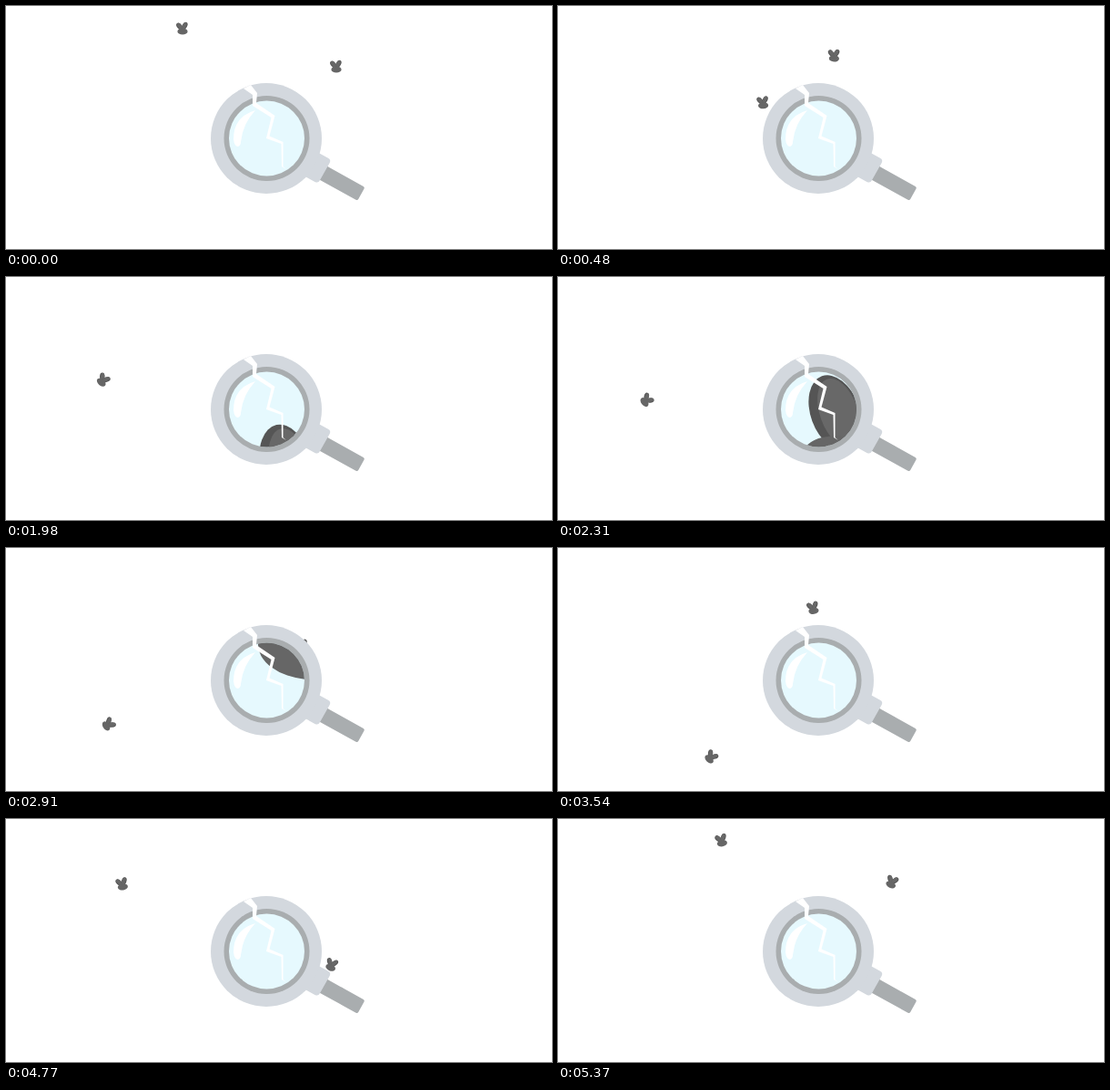
An HTML page that plays this animation: 600x268 px, repeating every 5.4 s.

```html
<!DOCTYPE html>
<html lang="en">
<head>
<meta charset="utf-8">
<title>Flies around a cracked magnifier</title>
<style>
  html, body { margin: 0; width: 100%; height: 100%; overflow: hidden; background: #fff; }
  svg { display: block; width: 600px; height: 268px; }
</style>
</head>
<body>
<svg viewBox="0 0 600 268">
  <defs>
    <clipPath id="glass"><circle cx="286.5" cy="146" r="41.5"/></clipPath>
    <g id="wing">
      <ellipse rx="2.7" ry="4.3" fill="#555"/>
      <ellipse cx=".4" cy=".2" rx="2.1" ry="4" fill="#686868"/>
    </g>
    <g id="fly">
      <use href="#wing" transform="translate(-3.4 -2.6) rotate(-38)"/>
      <use href="#wing" transform="translate(2.4 -3.2) rotate(28) scale(-1 1)"/>
      <ellipse cy="3" rx="5.6" ry="3.6" fill="#666"/>
    </g>
  </defs>

  <use id="a" href="#fly"/>
  <use id="b" href="#fly"/>

  <g transform="translate(286 146) rotate(29)">
    <rect x="70" y="-5.5" width="51" height="17" rx="2" fill="#a9adaf"/>
    <rect x="50" y="-14" width="24" height="30" rx="4" fill="#d3d8de"/>
  </g>
  <circle cx="286" cy="146" r="61" fill="#d3d8de"/>
  <circle cx="286.5" cy="146" r="47" fill="#a9adaf"/>
  <circle cx="286.5" cy="146" r="41.5" fill="#e6f9fe"/>
  <path d="M274 115Q250 122 250 147Q251 155 255 155Q258 154 258 150Q260 130 274 115Z" fill="#fff"/>
  <g clip-path="url(#glass)"><use id="big" href="#fly"/></g>
  <path d="M261 91L269 87L276 96L275 107L295.500 121L289.500 143.500L304.500 150L304.500 177L308 180L303 177L302.500 152L286 146L291.500 123L271 110L271 98Z" fill="#fff"/>
</svg>
<script>
const LOOP = 5400, STEP = 30;

// Points passed at equal time steps
const pathA = [
  [194, 25], [225, 101], [214, 193], [248, 240], [298, 200], [314, 168], [320, 140],
  [325, 74], [273, 67], [218, 83], [172, 98], [113, 52], [184, 25]
];
const pathB = [
  [363, 67], [308, 55], [232, 63], [167, 77], [118, 104], [98, 131], [104, 176],
  [128, 213], [176, 233], [248, 249], [325, 206], [371, 130], [365, 67]
];

// Catmull-Rom curve; the ends borrow their neighbours from the other end
function along(points, u) {
  const n = points.length - 1, i = Math.floor(u * n), f = u * n - i;
  const at = k => points[k < 0 ? n - 1 : k > n ? 1 : k];
  const [p, q, r, s] = [i - 1, i, i + 1, i + 2].map(at);
  return q.map((v, c) => v + f / 2 * (r[c] - p[c] +
    f * (2 * p[c] - 5 * v + 4 * r[c] - s[c] + f * (3 * (v - r[c]) + s[c] - p[c]))));
}

function place(id, [x, y], turn, scale = 1) {
  document.getElementById(id).setAttribute('transform',
    `translate(${x} ${y}) rotate(${turn}) scale(${scale})`);
}

function draw() {
  const t = Math.floor(performance.now() % LOOP / STEP) * STEP, u = t / LOOP;
  place('a', along(pathA, u), -10 * Math.sqrt(u));
  place('b', along(pathB, u), 25 * u + 45 * Math.sin(Math.PI * u) ** 4);

  // The magnified fly drifts straight up through the glass
  const v = (t - 2310) / 600;
  place('big', [329 + 6 * v, 185 - 106 * v], 18 - 14 * v, 10);
  requestAnimationFrame(draw);
}
draw();
</script>
</body>
</html>
```
